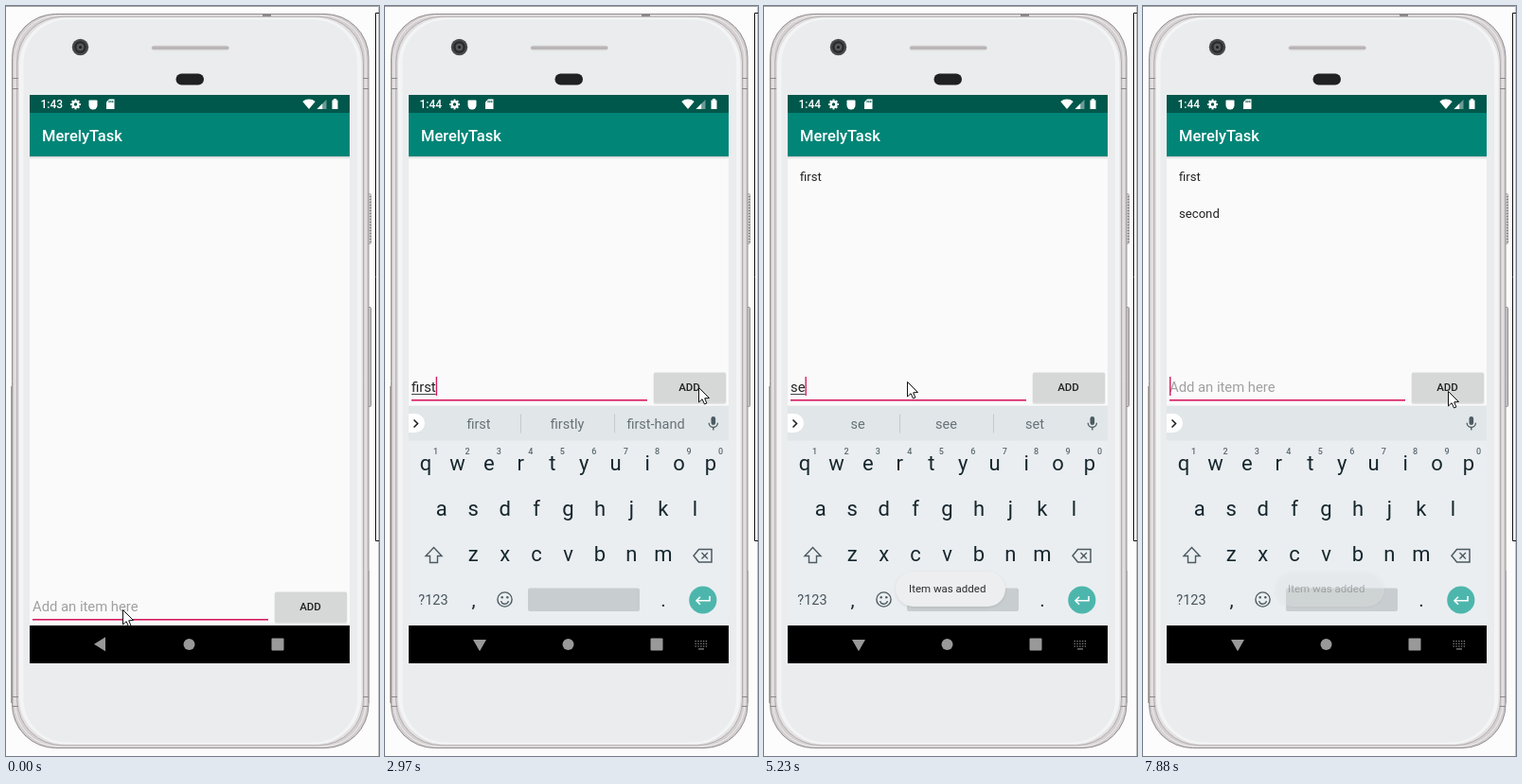
An HTML page with a canvas that plays this animation: 394x793 px, repeating every 8000 ms.

```html
<!DOCTYPE html>
<html lang="en">
<head>
<meta charset="utf-8">
<title>To-do demo</title>
<style>
  html, body { margin: 0; width: 100%; height: 100%; overflow: hidden; background: #fcfcfc; }
  canvas { display: block; width: 394px; height: 793px; }
</style>
</head>
<body>
<canvas id="stage"></canvas>
<script>
const W = 394, H = 793, LOOP = 8000, BLINK = 560, PINK = '#d81b60';
const canvas = document.getElementById('stage');
const c = canvas.getContext('2d');
const dpr = window.devicePixelRatio || 1;
canvas.width = W * dpr;
canvas.height = H * dpr;

const clamp = (v) => Math.max(0, Math.min(1, v));

// Each task is typed key by key, then added with a press of the button.
const tasks = [
  { word: 'first', keys: [1290, 1290, 1690, 1690, 1810], press: 3240 },
  { word: 'second', keys: [4830, 5230, 5500, 5640, 5920, 6070], press: 7460 }
];
const ADD_DELAY = 140;
const TAPS = [270, 4280];

const hints = {
  first: 'first firstly first-hand',
  s: 's so see',
  se: 'se see set',
  sec: 'sec *second secs',
  seco: 'seco *second seconds',
  secon: 'secon *second seconds',
  second: 'second seconds secondary'
};

// Mouse moves: quadratic curves, sampled in five even steps.
const STEPS = 5;
const moves = [
  { start: 2420, end: 2970, from: [124, 638], via: [501, 208], to: [332, 403] },
  { start: 3730, end: 4280, from: [332, 403], via: [242, 394], to: [152, 397] },
  { start: 6480, end: 7050, from: [152, 397], via: [419, 403], to: [323, 407] }
];

function mouseAt(t) {
  const move = moves.filter(m => t >= m.start).pop();
  if (!move) return moves[0].from;
  const beat = (move.end - move.start) / (STEPS - 1);
  const u = clamp((Math.floor((t - move.start) / beat) + 1) / STEPS);
  return move.from.map((a, i) =>
    (1 - u) ** 2 * a + 2 * u * (1 - u) * move.via[i] + u * u * move.to[i]);
}

function toastAt(t) {
  return Math.max(...tasks.map(({ press }) =>
    Math.min(clamp((t - press - 350) / 233), clamp((press + 2400 - t) / 250))));
}

function stateAt(t) {
  const done = tasks.filter(k => t >= k.press + ADD_DELAY);
  const task = tasks[done.length];
  const text = task ? task.word.slice(0, task.keys.filter(k => t >= k).length) : '';
  const edits = [...TAPS, ...tasks.flatMap(k => [...k.keys, k.press + ADD_DELAY])];
  const lastEdit = Math.max(...edits.filter(e => t >= e));
  const idle = done.length ? t - done[done.length - 1].press : 0;
  const words = text ? hints[text] : idle > 780 ? 'thanks I we' : '';
  return {
    text,
    items: done.map(k => k.word),
    words: t >= 2050 ? words : '',
    caret: t >= TAPS[0] && Math.floor((t - lastEdit) / BLINK) % 2 === 0,
    pressed: tasks.some(k => t >= k.press && t < k.press + 2 * ADD_DELAY),
    clock: t < 1690 ? '1:43' : '1:44',
    imeNav: t >= 570,
    raised: t >= 1290,
    keys: t >= 1690,
    slide: t < 1810 ? 46 : 0,
    toast: toastAt(t),
    mouse: mouseAt(t)
  };
}

function rect(x, y, w, h, fill) {
  c.fillStyle = fill;
  c.fillRect(x, y, w, h);
}

function round(x, y, w, h, r, fill, stroke) {
  c.beginPath();
  c.roundRect(x, y, w, h, r);
  if (fill) { c.fillStyle = fill; c.fill(); }
  if (stroke) { c.strokeStyle = stroke; c.lineWidth = 1; c.stroke(); }
}

function disc(x, y, r, fill) {
  c.beginPath();
  c.arc(x, y, r, 0, Math.PI * 2);
  c.fillStyle = fill;
  c.fill();
}

function arc(x, y, r, from, to, color, width) {
  c.beginPath();
  c.arc(x, y, r, from, to);
  c.strokeStyle = color;
  c.lineWidth = width;
  c.stroke();
}

function poly(points, fill) {
  c.beginPath();
  points.forEach(([x, y]) => c.lineTo(x, y));
  c.closePath();
  c.fillStyle = fill;
  c.fill();
}

function line(points, color, width = 1, closed = false) {
  c.beginPath();
  points.forEach(([x, y]) => c.lineTo(x, y));
  if (closed) c.closePath();
  c.strokeStyle = color;
  c.lineWidth = width;
  c.stroke();
}

// Chevron with its tip at (x, y), pointing along dir (1 right, -1 left).
function chevron(x, y, size, dir, color) {
  line([[x - dir * size, y - size], [x, y], [x - dir * size, y + size]], color, 1.6);
}

function label(str, x, y, size, color, align = 'left', weight = 400) {
  c.font = `${weight} ${size}px Roboto, sans-serif`;
  c.textAlign = align;
  c.fillStyle = color;
  c.fillText(str, x, y);
}

function shell(inset, r, fill, stroke) {
  round(6.5 + inset, 8.5 + inset / 2, 376.5 - 2 * inset, 776 - inset, r, fill, stroke);
}

function drawPhone() {
  rect(0, 0, W, H, '#fcfcfc');
  rect(0, 0, W, 1, '#a5a5a5');
  rect(393, 0, 1, H, '#c4c4c4');
  line([[394, 7.5], [390.5, 7.5], [390.5, 565.5], [394, 565.5]], '#111');

  // Side buttons and rims
  round(381, 318.5, 4.5, 105, 1, '#d0cccd', '#8f8a8b');
  round(381, 198.5, 4.5, 53, 1, '#d8d5d6', '#b0abac');
  for (let y = 201; y < 250; y += 3) rect(384, y, 2, 1, '#888');
  shell(0, 46, '#d4cfd0', '#918c8d');
  shell(3, 46, null, '#f1eeee');
  shell(5.5, 48, '#e4e1e2', '#b3aeaf');
  shell(7.5, 50, '#f3f4f5');
  shell(12, 46, '#eaecee');
  rect(271, 8, 9, 3, '#8d8889');
  rect(5, 402, 1, 335, '#aaa5a6');
  rect(383, 597, 1, 140, '#aaa5a6');
  for (const y of [76, 87, 730, 740]) {
    rect(7, y, 6, 1, '#8d8889');
    rect(377, y, 6, 1, '#8d8889');
  }

  ['#48494b', '#292a2c', '#55575b', '#1b1c1e'].forEach((fill, i) =>
    disc(78.5, 43.5, 8.7 - i * 2.4, fill));
  round(153.5, 41.5, 82, 6, 3, '#e0dedf');
  round(154, 42.5, 81.5, 3.5, 1.7, '#b9b5b6');
  round(179.5, 71.5, 29.5, 12, 6, '#202123');
}

function drawStatus(clock) {
  const bar = '#00574b';
  rect(25, 94, 338, 19, bar);
  label(clock, 36.5, 108, 12, '#fff', 'left', 500);

  for (let i = 0; i < 8; i++) {
    const a = i * Math.PI / 4;
    line([[73.5, 104], [73.5 + 5.4 * Math.cos(a), 104 + 5.4 * Math.sin(a)]], '#fff', 2);
  }
  disc(73.5, 104, 4, '#fff');
  disc(73.5, 104, 1.7, bar);

  round(87.5, 99.5, 9, 10, [1, 1, 5, 5], '#fff');
  poly([[109, 98.5], [114.5, 98.5], [114.5, 109], [106, 109], [106, 101.5]], '#fff');
  for (let i = 0; i < 3; i++) rect(108.5 + i * 1.9, 100, 1, 2.2, bar);

  c.beginPath();
  c.moveTo(320, 109);
  c.arc(320, 109, 10.5, -Math.PI * 0.72, -Math.PI * 0.28);
  c.fillStyle = '#fff';
  c.fill();
  for (const [size, fill] of [[10, '#6b9c95'], [5.7, '#fff']]) {
    poly([[328.5, 109], [328.5 + size, 109], [328.5 + size, 109 - size]], fill);
  }
  rect(344.5, 99.5, 6, 9.5, '#fff');
  rect(346, 98, 3, 2, '#fff');
}

function drawApp(items) {
  rect(25, 113, 338, 543, '#fafafa');
  rect(25, 113, 338, 46, '#008577');
  for (let i = 0; i < 3; i++) rect(25, 159 + i, 338, 1, `rgba(0,0,0,${0.16 / 2 ** i})`);
  label('MerelyTask', 38, 143, 16.5, '#fff', 'left', 500);
  items.forEach((item, i) => label(item, 38, 184.5 + i * 39.3, 13.15, '#222'));
}

function drawInput(s) {
  const y = s.raised ? 387 : 619;
  if (s.text) label(s.text, 28, y + 21, 14.8, '#222');
  else label('Add an item here', 28, y + 21, 14.8, '#a0a0a0');
  const width = s.text ? c.measureText(s.text).width : 0;
  if (s.text) rect(28, y + 23, width, 1, '#444');
  rect(28, y + 29, 249, 1.6, PINK);
  if (s.caret) rect(28 + width, y + 5, 1.4, 20, PINK);

  round(283.5, y + 1, 77, 33, 2, '#e2e3e3');
  round(284, y + 0.5, 76, 32, 1.5, s.pressed ? '#c6c7c7' : '#d6d7d7');
  label('ADD', 321.5, y + 20.3, 11.5, '#222', 'center', 500);
}

function drawIcons() {
  const ink = '#4c5a61';
  round(10, 431, 32, 20, 10, '#fff');
  chevron(34.5, 441.5, 4, 1, '#222');

  // Microphone
  round(344.5, 434, 4.6, 9, 2.3, ink);
  arc(346.8, 440.8, 4.6, 0, Math.PI, ink, 1.3);
  rect(346.1, 445.4, 1.4, 3, ink);

  // Shift: half an outline, mirrored
  const half = [[0, 572.5], [8.5, 581.5], [4, 581.5], [4, 588.5]];
  const mirrored = half.map(([x, y]) => [-x, y]).reverse();
  line([...half, ...mirrored].map(([x, y]) => [51.5 + x, y]), ink, 1.4, true);

  // Backspace
  line([[326, 581.3], [331.5, 574.5], [345, 574.5], [345, 588], [331.5, 588]], ink, 1.5, true);
  for (const d of [-3.2, 3.2]) line([[337.7 - d, 578.1], [337.7 + d, 584.5]], ink, 1.4);

  // Emoji
  arc(126.5, 627.5, 7.6, 0, Math.PI * 2, ink, 1.4);
  arc(126.5, 628.3, 4, 0.2, Math.PI - 0.2, ink, 1.4);
  for (const d of [-2.8, 2.8]) disc(126.5 + d, 625.3, 1.2, ink);

  // Enter
  disc(335.8, 628, 14.6, '#4db6ac');
  line([[343, 624], [343, 628.7], [329.5, 628.7]], '#fff', 1.6);
  chevron(329, 628.7, 4, -1, '#fff');
}

function drawWords(words) {
  words.split(' ').forEach((word, i) => {
    const bold = word[0] === '*';
    label(word.replace('*', ''), 99 + i * 93.5, 447, 14.5,
      bold ? '#000' : '#667177', 'center', bold ? 700 : 400);
  });
  for (const x of [143, 242]) rect(x, 431.5, 1, 20, '#c3cacd');
}

function drawKeys(s) {
  const pitch = 33.45, dark = '#17272e';
  c.save();
  c.beginPath();
  c.rect(25, 422, 338, 234);
  c.clip();
  c.translate(0, s.slide);
  rect(25, 422, 338, 234, '#eaeef1');
  rect(25, 422, 338, 37.5, '#e1e6e9');
  rect(25, 422, 338, 1, '#eff1f2');
  if (s.words) drawWords(s.words);

  ['qwertyuiop', 'asdfghjkl', 'zxcvbnm'].forEach((letters, row) => {
    const x = 193.5 - (letters.length - 1) / 2 * pitch;
    [...letters].forEach((ch, i) => label(ch, x + i * pitch, 490.5 + row * 48.2, 22, dark, 'center'));
  });
  for (let i = 0; i < 10; i++) {
    label((i + 1) % 10, 53.5 + i * pitch, 474, 9, '#5d696f', 'center', 500);
  }
  label('?123', 51, 633, 14.5, '#46545b', 'center');
  label(',', 93.5, 635, 21, dark, 'center');
  label('.', 294, 635, 21, dark, 'center');
  round(151, 615.5, 118, 24.5, 2, '#c8cdcf');
  drawIcons();
  c.restore();
}

function drawNav(ime) {
  const ink = '#999';
  rect(25, 655, 338, 40, '#000');
  poly(ime ? [[93, 670], [107, 670], [100, 682.3]] : [[93, 674.8], [105, 667.3], [105, 682.3]], ink);
  disc(193.5, 675, 6, ink);
  round(280.5, 668.5, 13, 13, 1, ink);
  if (!ime) return;
  for (let i = 0; i < 15; i++) {
    rect(327.5 + i % 5 * 2.8, 671 + Math.floor(i / 5) * 2.7, 1.4, 1.2, '#888');
  }
  rect(331, 679.3, 6, 1.2, '#888');
}

function drawToast(alpha) {
  if (!alpha) return;
  c.save();
  c.globalAlpha = alpha;
  c.shadowColor = 'rgba(0,0,0,0.1)';
  c.shadowBlur = 3 * dpr;
  c.shadowOffsetY = dpr;
  round(139, 597.5, 116, 37.5, 18.75, '#eceeef');
  c.shadowColor = 'transparent';
  label('Item was added', 153, 620, 11.5, '#2c2c2c');
  c.restore();
}

function drawMouse([x, y]) {
  const left = Math.round(x) - 0.5, top = Math.round(y) + 0.5;
  const shape = [[0, 0], [0, 15.5], [3.6, 12.2], [6, 17.5], [8.4, 16.5], [6.2, 11.3], [11, 11]];
  const points = shape.map(([dx, dy]) => [left + dx, top + dy]);
  poly(points, '#fff');
  line(points, '#111', 1, true);
}

function frame(t) {
  const s = stateAt(t);
  c.setTransform(dpr, 0, 0, dpr, 0, 0);
  drawPhone();
  drawApp(s.items);
  drawStatus(s.clock);
  drawInput(s);
  if (s.keys) drawKeys(s);
  drawNav(s.imeNav);
  drawToast(s.toast);
  drawMouse(s.mouse);
}

const begin = performance.now();
function tick() {
  frame((performance.now() - begin) % LOOP);
  requestAnimationFrame(tick);
}
tick();
</script>
</body>
</html>
```
